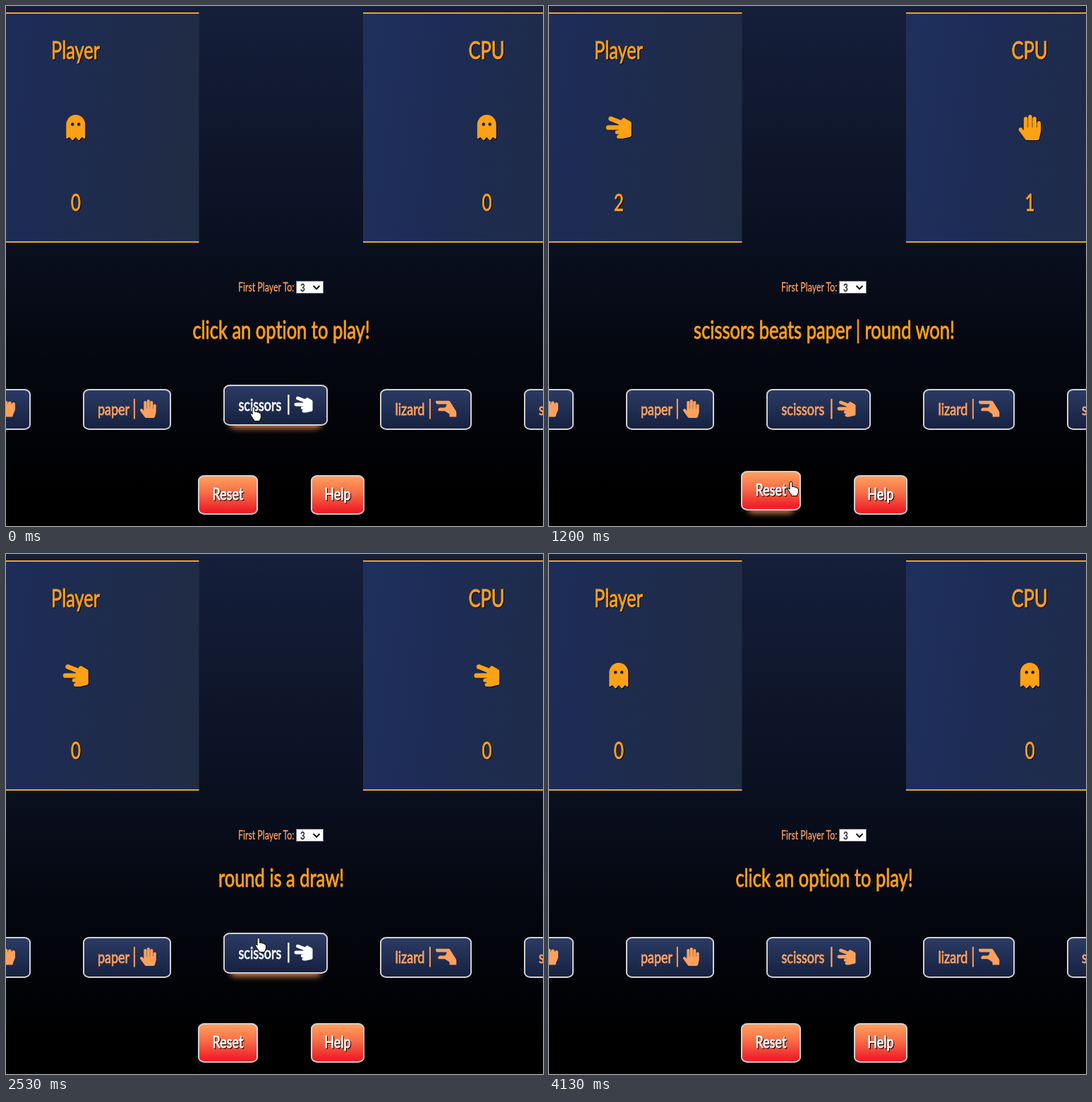
An HTML page that plays this animation: 761 px wide and 736 px high, repeating every 4.59 s.

```html
<!DOCTYPE html>
<html lang="en">
<head>
<meta charset="utf-8">
<title>Rock paper scissors lizard spock</title>
<style>
  html, body { margin: 0; width: 100%; height: 100%; overflow: hidden; background: #000; }
  svg { display: block; width: 761px; height: 736px; }
  text {
    font-family: Lato, "Open Sans", sans-serif; font-variant-ligatures: none;
    fill: currentColor; stroke: currentColor; stroke-width: .9;
  }
  .gold { color: #ffa116; }
  .peach { color: #ffa05c; }
  .white { color: #fff; }
  .ink { color: #111; }
  .small text { stroke-width: .3; }
  .shade { filter: drop-shadow(1.5px 1.5px 0 #000); }
</style>
</head>
<body>
<svg id="stage" viewBox="0 0 761 736" xmlns="http://www.w3.org/2000/svg"></svg>
<script>
const LOOP = 4590, FPS = 15, FADE = 200, NARROW = 0.75;

const ICONS = {
  ghost: [384, "M186 0C81 3 0 95 0 200v264c0 14 17 21 27 11l25-18c7-5 16-4 22 2l43 48c6 6 16 6 22 0l41-45c6-7 18-7 24 0l41 45c6 6 16 6 22 0l43-48c6-6 15-7 22-2l25 18c10 10 27 3 27-11V192C384 84 295-3 186 0zM128 224a32 32 0 1 1 0-64a32 32 0 1 1 0 64zm128 0a32 32 0 1 1 0-64a32 32 0 1 1 0 64z"],
  rock: [512, "M465 80c-27 0-49 21-49 48h-8V97c0-26-21-48-47-49-27 0-49 21-49 48v32h-8V81c0-26-21-48-47-49-27 0-49 21-49 48v48h-8V97c0-26-21-48-47-49-27 0-49 21-49 48v136l-8-7v-48c0-26-21-48-47-49C22 128 0 149 0 176v66c0 28 12 54 32 72l112 99c10 10 16 23 16 36v7c0 13 11 24 24 24h240c13 0 24-11 24-24v-3c0-13 3-25 8-37l49-116c5-12 7-25 7-38V129c0-26-21-48-47-49z"],
  paper: [448, "M409 128c-23 0-41 18-41 41v87h-8V80c0-23-18-41-41-41-22 0-39 18-39 40v177h-8V41c0-23-18-41-41-41-22 0-39 18-39 40v216h-8V81c0-23-18-41-41-41-22 0-39 18-39 40v236l-32-44c-13-17-38-21-56-8-17 13-21 38-8 55l125 173a48 48 0 0 0 39 20h198c22 0 41-15 46-37l27-113a192 192 0 0 0 5-44V168c0-22-17-40-39-40z"],
  scissors: [512, "M216 440c0-22 18-40 40-40v-8h-32a40 40 0 0 1 0-80h32v-8H48a48 48 0 0 1 0-96h208v-14L78 125c-24-10-36-38-27-62 10-25 38-37 63-27l190 74 25-31c12-15 34-19 51-9l112 64a40 40 0 0 1 20 34v240c0 19-13 35-31 39l-136 32a40 40 0 0 1-9 1h-80c-22 0-40-18-40-40z"],
  lizard: [576, "M384 480h192V364a96 96 0 0 0-15-51L398 54a48 48 0 0 0-40-22H24C11 32 0 43 0 56v16c0 31 25 56 56 56h230c13 0 22 13 17 25l-22 51a32 32 0 0 1-29 20H128c-35 0-64 29-64 64v8c0 13 11 24 24 24h147a48 48 0 0 1 26 7l112 71a24 24 0 0 1 11 20z"]
};
const HAND = "M-2 2a1.8 1.8 0 0 1 3.6 0v5.5q2.6-1.3 3.4 .6q2.6-.8 3 1q2.4-.2 2.4 1.9v3.6q0 2.6-1.7 4.4v1.5h-8v-1.5q-2.2-1.8-3.2-4.5l-2.3-3.6q.4-2.2 2.5-.9l.3 1z";
const ARROW = "M0 0V15.5L3.6 12.2L6 18L8.6 17L6 11.4H11Z";

const START = "click an option to play!";
// time, player icon, cpu icon, player score, cpu score, message
const ROUNDS = [
  [0, "ghost", "ghost", 0, 0, START],
  [200, "scissors", "paper", 1, 0, "scissors beats paper | round won!"],
  [533, "scissors", "rock", 1, 1, "scissors loses to rock | round lost!"],
  [733, "scissors", "paper", 2, 1, "scissors beats paper | round won!"],
  [1466, "ghost", "ghost", 0, 0, START],
  [2533, "scissors", "scissors", 0, 0, "round is a draw!"],
  [2800, "scissors", "lizard", 1, 0, "scissors beats lizard | round won!"],
  [3666, "ghost", "ghost", 0, 0, START]
];
// time, x, y of the pointer tip
const PATH = [
  [733, 351, 567], [800, 351, 585], [867, 348, 612], [933, 346, 645], [1000, 343, 668], [1067, 343, 673],
  [1933, 343, 673], [2000, 342.5, 615], [2067, 350, 575], [2133, 356, 550], [2200, 358, 543],
  [2933, 358, 543], [3000, 355, 562], [3067, 345, 622], [3133, 330, 677],
  [3800, 330, 677], [3867, 300, 698], [3933, 230, 716], [4000, 142, 728], [4067, 40, 770]
];
const HOVER = {
  scissors: [[-1000, 830], [2040, 3050]],
  reset: [[970, 1990], [3112, 3890]]
};

const label = (x, y, size, str, anchor = "start", attrs = "") =>
  `<text transform="translate(${x} ${y}) scale(${NARROW} 1)" font-size="${size}" text-anchor="${anchor}" ${attrs}>${str}</text>`;
const place = (x, y, size) => `translate(${x} ${y}) scale(${size / 512})`;
const icon = (name, x, y, size) =>
  `<path d="${ICONS[name][1]}" fill="currentColor" transform="${place(x, y, size)}"/>`;

function button(id, x, y, w, h, fill, body, cls) {
  return `<g id="${id}" class="${cls}">
    <rect class="glow" x="${x + 9}" y="${y + 20}" width="${w - 18}" height="${h - 16}" rx="8" fill="#f0925a" filter="url(#blur)" opacity="0"/>
    <rect x="${x + 1}" y="${y + 1}" width="${w - 2}" height="${h - 2}" rx="8" ry="6.5" fill="url(#${fill})" stroke="#d2d2d4" stroke-width="2"/>
    ${body}</g>`;
}
const choice = (name, x, w, textX, barX, iconX) => button(name, x, 542, w, 58, "blue",
  label(textX, 578.5, 24, name) + label(barX, 579, 28, "|", "middle") +
  (ICONS[name] ? icon(name, iconX, 557, 26) : ""), "peach");
const action = (name, x, w) => button(name.toLowerCase(), x, 664, w, 56, "red",
  `<g class="shade">${label(x + w / 2, 699, 24, name, "middle")}</g>`, "white");

function panel(x, title, id) {
  const mid = x + 175;
  return `<rect x="${x}" y="10" width="350" height="324" fill="url(#panel)"/>
    <path d="M${x} 10h350M${x} 334h350" stroke="#f0a02a" stroke-width="2"/>
    <g class="gold shade">${label(mid, 75, 34, title, "middle")}
      <path id="${id}Icon" fill="currentColor"/>
      ${label(mid + .5, 290, 32, "0", "middle", `id="${id}Score"`)}</g>`;
}
const gradient = (id, stops, dir) => `<linearGradient id="${id}" ${dir || 'x2="0" y2="1"'}>` +
  stops.map(([at, c]) => `<stop offset="${at}" stop-color="${c}"/>`).join("") + "</linearGradient>";

const $ = id => document.getElementById(id);
$("stage").innerHTML = `<defs>
    ${gradient("sky", [[0, "#151f3b"], [.45, "#0a1020"], [.7, "#04060e"], [.95, "#000"]])}
    ${gradient("panel", [[0, "#1f305e"], [.35, "#1d2c55"], [1, "#202b44"]], 'x2="1" y2=".12"')}
    ${gradient("blue", [[0, "#2b3b64"], [1, "#162140"]])}
    ${gradient("red", [[0, "#ffa25e"], [.45, "#f96c46"], [.9, "#ee2229"], [1, "#ee2229"]])}
    <filter id="blur" x="-20%" y="-50%" width="140%" height="200%"><feGaussianBlur stdDeviation="4"/></filter>
  </defs>
  <rect width="761" height="736" fill="url(#sky)"/>
  ${panel(-76.5, "Player", "player")}${panel(506, "CPU", "cpu")}
  <g class="peach small">${label(329, 403.5, 16.5, "First Player To:")}</g>
  <rect x="411.5" y="389.5" width="38" height="17" fill="#fff" stroke="#767676"/>
  <g class="ink small">${label(417, 403.5, 15.5, "3")}</g>
  <path d="M435.5 396l4.5 4.5l4.5-4.5" fill="none" stroke="#111" stroke-width="2"/>
  <g class="gold">${label(390, 470.5, 34, START, "middle", 'id="message"')}</g>
  ${choice("rock", -84, 119, -64, -21, -13)}
  ${choice("paper", 109, 125, 130, 182, 190)}
  ${choice("scissors", 308, 148, 329.5, 400.5, 408.5)}
  ${choice("lizard", 530, 130, 551.5, 601, 609)}
  ${choice("spock", 734, 130, 755, 806, 0)}
  ${action("Reset", 272, 85)}${action("Help", 432, 76)}
  <path id="cursor" fill="#fff" stroke="#000" stroke-width="1" stroke-linejoin="round"/>`;

// CSS "ease": cubic-bezier(.25, .1, .25, 1)
function ease(p) {
  if (p <= 0) return 0;
  if (p >= 1) return 1;
  const bez = (u, a, b) => 3 * a * u * (1 - u) ** 2 + 3 * b * u * u * (1 - u) + u ** 3;
  let lo = 0, hi = 1;
  for (let i = 0; i < 20; i++) {
    const mid = (lo + hi) / 2;
    if (bez(mid, .25, .25) < p) lo = mid; else hi = mid;
  }
  return bez(lo, .1, 1);
}
const level = (t, spans) =>
  spans.reduce((sum, [a, b]) => sum + ease((t - a) / FADE) - ease((t - b) / FADE), 0);
const inside = (t, spans) => spans.some(([a, b]) => t >= a && t < b);

function pointer(t) {
  if (t <= PATH[0][0]) return PATH[0].slice(1);
  const i = PATH.findIndex(p => p[0] > t);
  if (i < 0) return PATH[PATH.length - 1].slice(1);
  const [t0, x0, y0] = PATH[i - 1], [t1, x1, y1] = PATH[i];
  const k = (t - t0) / (t1 - t0);
  return [x0 + (x1 - x0) * k, y0 + (y1 - y0) * k];
}

function setSide(id, name, score, mid) {
  const size = 36, width = ICONS[name][0] * size / 512;
  $(id + "Icon").setAttribute("d", ICONS[name][1]);
  $(id + "Icon").setAttribute("transform", place(mid - width / 2, 154, size));
  $(id + "Score").textContent = score;
}

function lift(id, amount) {
  const g = $(id);
  g.setAttribute("transform", `translate(0 ${-6 * amount})`);
  g.querySelector(".glow").setAttribute("opacity", .85 * amount ** 3);
}

function draw(time) {
  const t = Math.floor((time + 5) * FPS / 1000) * 1000 / FPS;
  const [, mine, theirs, myScore, cpuScore, message] = ROUNDS.filter(r => r[0] <= t + 1).pop();
  setSide("player", mine, myScore, 98.8);
  setSide("cpu", theirs, cpuScore, 681.3);
  $("message").textContent = message;

  const lit = level(t, HOVER.scissors);
  lift("scissors", lit);
  lift("reset", level(t, HOVER.reset));
  const mix = (a, b) => Math.round(a + (b - a) * lit);
  $("scissors").style.color = `rgb(255,${mix(160, 255)},${mix(92, 255)})`;

  const [x, y] = pointer(t);
  const overButton = inside(t, HOVER.scissors) || inside(t, HOVER.reset);
  $("cursor").setAttribute("d", overButton ? HAND : ARROW);
  $("cursor").setAttribute("transform", `translate(${x} ${y})`);
}

function tick() {
  draw(performance.now() % LOOP);
  requestAnimationFrame(tick);
}
tick();
</script>
</body>
</html>
```
